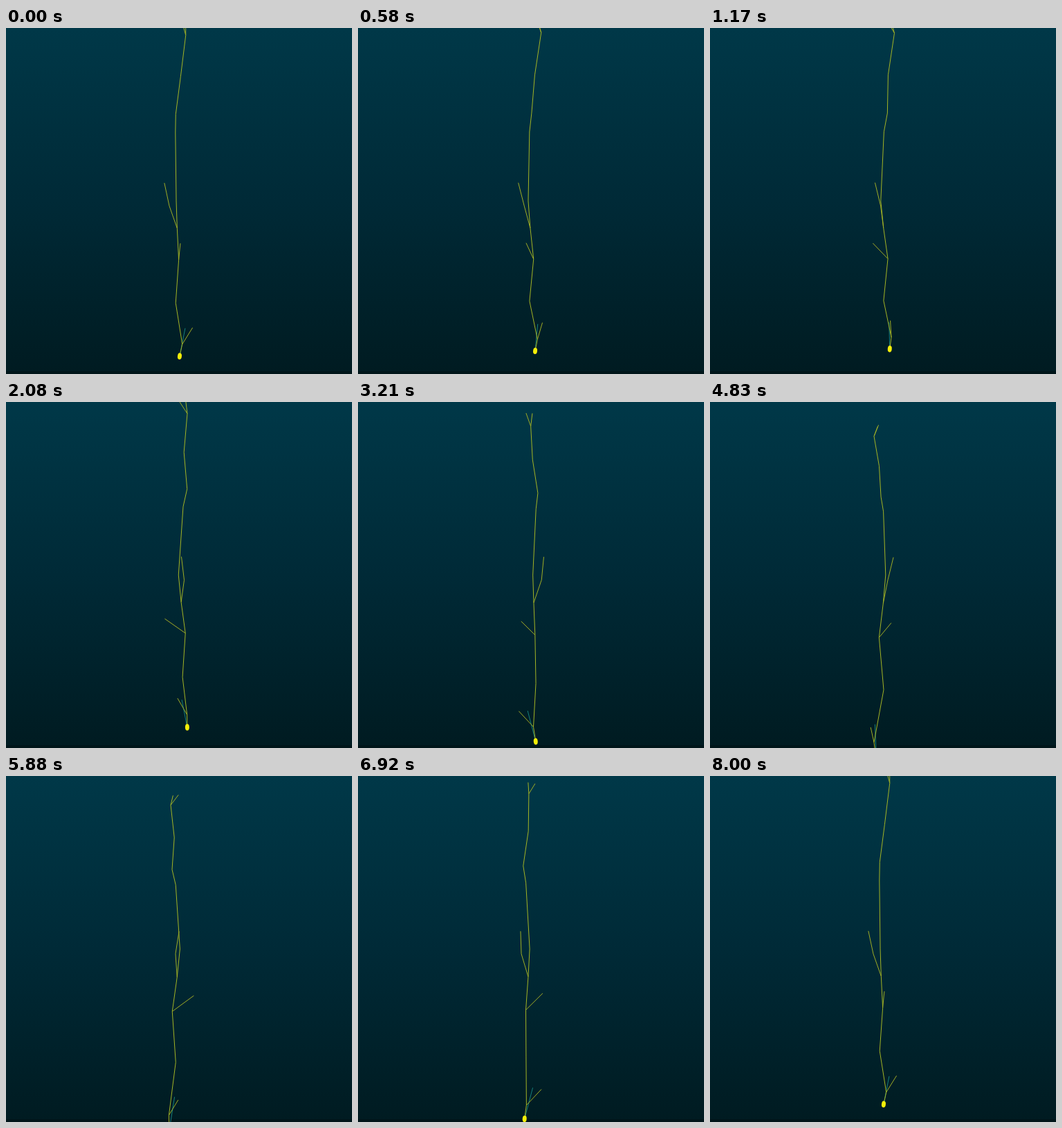
Recreate the animation shown at these times as an HTML page with a canvas. Size 500 px wide and 500 px high, loop 8040 ms.

```html
<!DOCTYPE html>
<html>
<head>
<meta charset="utf-8">
<style>
html, body { margin: 0; height: 100%; overflow: hidden; background: #001b21; }
canvas { display: block; width: 500px; height: 500px; }
</style>
</head>
<body>
<canvas id="stage" width="500" height="500"></canvas>
<script>
const ctx = document.getElementById('stage').getContext('2d');
const LOOP = 8040, STEP = 1000 / 24, TURN = 192;
const CENTER_X = 250, CENTER_Y = 240;
const CAMERA = 770;                        // distance of the camera
const LEAN = .354, LEAN_ANGLE = Math.PI * .256;   // tilt of the whole cell in depth

// Key points in space: side, depth and height on the stage
const point = (side, depth, height) => ({ side, depth, height });
const fork = point(9, 12, 28);
const upperNode = point(-2.7, 3, 290);
const middleNode = point(-.4, 9.5, 337);
const lowerNode = point(5, 13, 470);
const soma = point(1, 13, 490);

const stem = [
  point(4, 9, 10), fork, point(2.2, 7, 80), point(-4.5, 11, 130), point(-5, 5.5, 154),
  point(-4, -1, 250), upperNode, middleNode, point(-5, 5, 405), lowerNode, soma
];
const branches = [
  [fork, point(9, 0, 11)],
  [upperNode, point(-14, 6.5, 257), point(-21, 2, 224)],
  [middleNode, point(2, -21, 315)],
  [lowerNode, point(21, -1, 447)]
];
const tealBranch = [soma, point(9.5, 5, 446)];

// Turn about the vertical axis, then view in perspective
function project({ side, depth, height }, angle) {
  const x = side * Math.cos(angle) + depth * Math.sin(angle);
  const y = height - CENTER_Y;
  const away = side * Math.sin(angle) - depth * Math.cos(angle)
    + LEAN * y * Math.cos(angle - LEAN_ANGLE);
  const scale = 1 - away / CAMERA;
  return [CENTER_X + x * scale, CENTER_Y + y * scale];
}

function trace(points, angle, color) {
  ctx.beginPath();
  points.forEach(p => ctx.lineTo(...project(p, angle)));
  ctx.strokeStyle = color;
  ctx.stroke();
}

function drawSoma(angle) {
  const [x, y] = project(soma, angle);
  const [nodeX, nodeY] = project(lowerNode, angle);
  ctx.save();
  ctx.translate(x, y);
  ctx.rotate(Math.atan2(nodeX - x, y - nodeY) * .6);
  ctx.beginPath();
  ctx.ellipse(0, 0, 3, 4.7, 0, 0, 2 * Math.PI);
  ctx.fillStyle = '#f4ee08';
  ctx.fill();
  ctx.restore();
}

const sky = ctx.createLinearGradient(0, 0, 0, 500);
['#003848', '#002a37', '#001b21'].forEach((color, i) => sky.addColorStop(i / 2, color));

function drawSky() {
  ctx.fillStyle = sky;
  ctx.fillRect(0, 0, 500, 500);
  ctx.fillStyle = '#001519';
  ctx.fillRect(0, 496, 500, 4);
}

function draw(time) {
  const frame = Math.floor((time % LOOP + 4) / STEP);
  const angle = 2 * Math.PI * frame / TURN;
  drawSky();
  ctx.lineWidth = 1;
  ctx.lineJoin = 'round';
  trace(tealBranch, angle, '#16807c');
  branches.forEach(branch => trace(branch, angle, '#a0ad25'));
  trace(stem, angle, '#a4b425');
  drawSoma(angle);
}

const start = performance.now();
function tick() {
  draw(performance.now() - start);
  requestAnimationFrame(tick);
}
tick();
</script>
</body>
</html>
```
